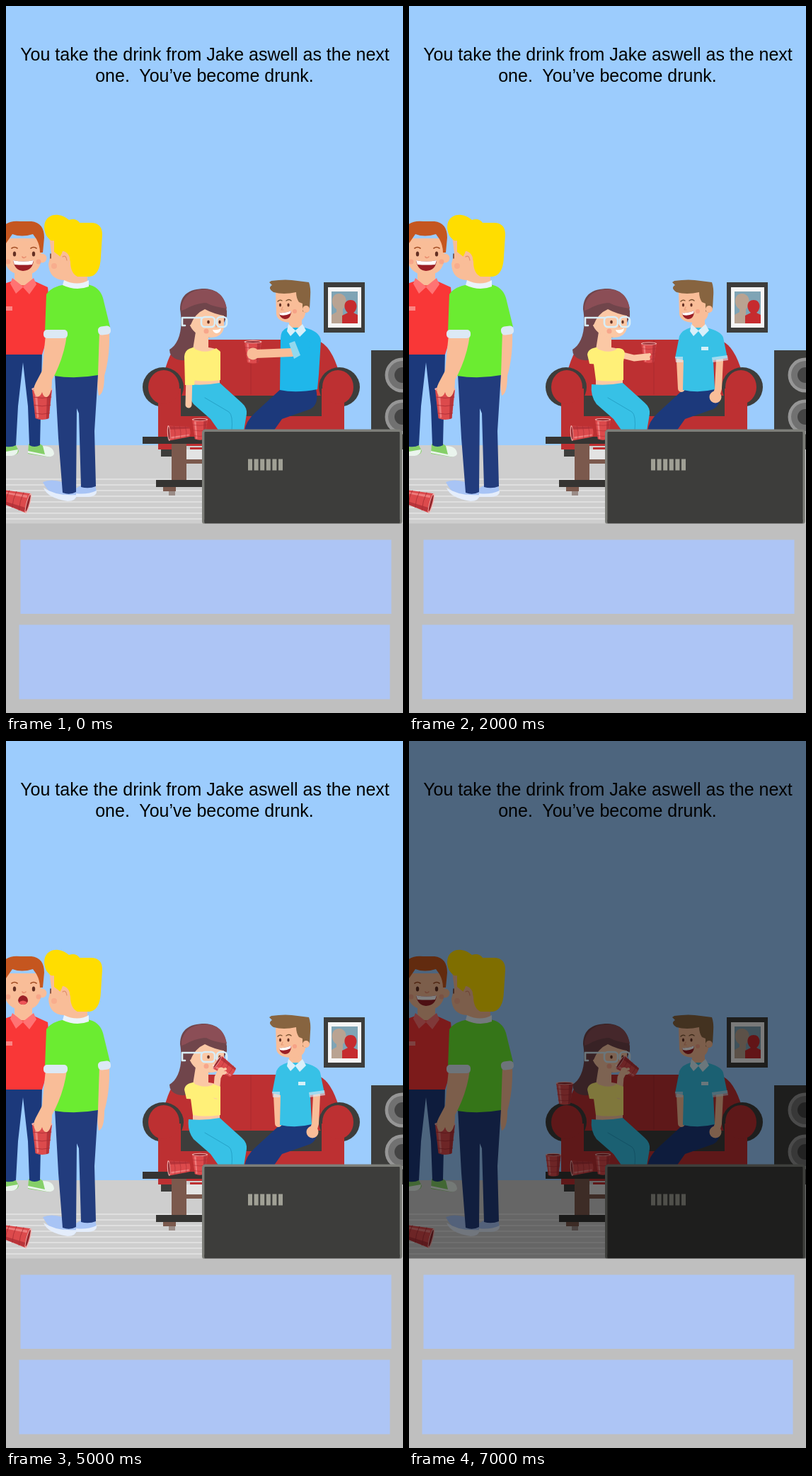
An HTML page for the animation above (8000 ms loop, 561 by 998 pixels).

```html
<!DOCTYPE html>
<html lang="en">
<head>
<meta charset="utf-8">
<title>Party scene</title>
<style>
  html, body { margin: 0; width: 100%; height: 100%; overflow: hidden; }
  svg { display: block; width: 561px; height: 998px; }
  text { font: 25px "Liberation Sans", Arial, sans-serif; text-anchor: middle; }
  .line { fill: none; stroke-linecap: round; stroke-linejoin: round; }
  .skin { fill: #f9bd98; }
  .arm { stroke: #f9bd98; }
  .fair { fill: #fbc8a5; }
  .fairArm { stroke: #fbc8a5; stroke-width: 9; }
  .navy { fill: #1c397b; }
  .cyan { fill: #37c1e6; }
  .dark { fill: #3d3d3b; }
  .red { fill: #bd3032; }
  .yellow { fill: #fff078; }
  .cuff { fill: #dce9f5; }
  .eye { fill: #633023; }
  .mouth { fill: #9b1f26; }
  .blush { fill: #f58f79; }
</style>
</head>
<body>
<svg viewBox="0 0 561 998">
  <defs>
    <g id="cup">
      <path fill="#dc4a4c" d="M-12-15H12L8 14Q0 17-8 14z"/>
      <path fill="#b8343a" d="M6-13H11L8 14 5 15z"/>
      <path fill="#ee7c7c" d="M-9-12H-6L-4 13-6 14z"/>
      <path class="line" stroke="#a82d34" stroke-width=".6" d="M-11-7Q0-5 11-7M-10 1Q0 3 10 1M-9 9Q0 11 9 9"/>
      <ellipse cy="-15" rx="12.5" ry="2.2" fill="#f2b3b0"/>
      <ellipse cy="-14.8" rx="10.5" ry="1.3" fill="#96282e"/>
    </g>
    <g id="woofer">
      <circle r="24.5" fill="#969696"/>
      <circle r="20" fill="#717171"/>
      <circle r="11" fill="#444"/>
    </g>
    <pattern id="rug" width="16" height="16" y="662" patternUnits="userSpaceOnUse">
      <path stroke="#e5e5e5" stroke-width="1.5" d="M0 6H16M0 14H16"/>
    </pattern>
  </defs>

  <!-- room -->
  <rect width="561" height="731" fill="#9cccfd"/>
  <rect y="620" width="561" height="111" fill="#cecece"/>
  <rect y="662" width="290" height="66" fill="url(#rug)"/>
  <rect class="dark" x="449" y="390" width="58" height="71"/>
  <rect x="455" y="397" width="47" height="57" fill="#f5f5f5"/>
  <rect x="460" y="403" width="37" height="45" fill="#7fa4b5"/>
  <path fill="#b9a392" d="M460 448V436L467 432V428C456 420 461 405 471 406C483 407 483 422 476 428V448z"/>
  <path fill="#c62b2e" d="M475 448V437L483 433C476 427 477 415 487 415C497 415 498 428 491 433L497 436V448z"/>
  <rect class="dark" x="516" y="486" width="45" height="140"/>
  <use href="#woofer" x="560" y="521"/>
  <use href="#woofer" x="560" y="580"/>

  <!-- sofa -->
  <path class="red" d="M225 560V512Q237 472 255 471H435Q457 473 470 515V560z"/>
  <path class="dark" d="M245 550H449V582H245zM219 624H236V636H219z"/>
  <rect class="red" x="246" y="579" width="202" height="42"/>
  <path class="line" stroke="#a92b2e" d="M346 548V472"/>
  <ellipse class="dark" cx="222" cy="538" rx="29" ry="28"/>
  <ellipse class="dark" cx="471" cy="538" rx="29" ry="28"/>
  <path class="red" d="M215 540H247V626H215zM446 540H478V626H446z"/>
  <ellipse class="red" cx="223" cy="538" rx="22" ry="24"/>
  <ellipse class="red" cx="469" cy="538" rx="22" ry="24"/>
  <use href="#cup" data-on="7" x="220" y="498"/>

  <!-- man on the sofa -->
  <path class="navy" d="M388 541H438Q443 562 430 569L390 583 378 600H337Q339 586 352 574z"/>
  <path class="skin" d="M400 438H418V456Q408 463 400 456z"/>
  <path class="skin" d="M381 403H423V434Q421 447 404 447Q384 447 382 435z"/>
  <path fill="#876440" d="M375 388Q396 385 412 388L428 390Q431 398 430 410L429 428 424 433 419 431V420L414 418Q410 412 410 404Q392 408 378 404Q369 398 376 394L372 390z"/>
  <circle class="skin" cx="424" cy="428" r="5"/>
  <circle class="blush" cx="408" cy="431" r="3" opacity=".6"/>
  <g class="eye">
    <ellipse cx="387.5" cy="422" rx="1.6" ry="2.5"/><ellipse cx="399" cy="422" rx="1.6" ry="2.5"/>
  </g>
  <path class="line" stroke="#76502f" stroke-width="1.3" d="M384 417Q387 414 390 416M396 416Q400 413 403 416"/>
  <path class="line" stroke="#e79a79" stroke-width="1.2" d="M391 425L389 429H392"/>
  <path class="mouth" d="M386 433Q395 434 403 430Q403 442 394 442Q387 441 386 433z"/>
  <path fill="#fff" d="M386 433Q395 434 403 430L402 434Q394 438 387 436z"/>
  <g data-on="234567">
    <path class="line arm" stroke-width="10" d="M383 500L385 540M439 500L437 540 434 551"/>
    <circle class="skin" cx="433" cy="552" r="8.5"/>
    <path class="cyan" d="M398 454H420Q441 459 444 468L450 497 430 500 432 541Q410 547 387 542L388 500 376 497 382 466Q386 457 398 454z"/>
    <path class="cuff" fill-opacity=".65" d="M376 495H387V503H377zM428 496L450 493 451 500 429 503z"/>
    <rect x="413" y="481" width="10" height="5" fill="#d5f0f8"/>
  </g>
  <g data-on="01">
    <path fill="#1fb7ea" d="M398 454H422Q443 459 445 472L442 520 440 541Q410 547 387 542L388 470Q388 457 398 454z"/>
    <use href="#cup" x="349" y="489"/>
    <path class="line arm" stroke-width="12" d="M404 489L353 491"/>
    <circle class="skin" cx="349" cy="491" r="8.5"/>
    <path fill="#1fb7ea" d="M420 468L436 477 409 497 402 476z"/>
    <path fill="#91d8ee" d="M400 476L408 473 416 493 407 498z"/>
  </g>
  <path fill="#d8effa" d="M399 449L409 458 419 449 424 458 415 467 409 459 402 466 397 459z"/>

  <!-- woman on the sofa -->
  <path fill="#70454b" d="M246 428C246 406 261 399 281 399C302 400 313 414 312 438L300 465 278 470Q281 492 262 497Q252 502 242 499Q231 495 231 485C243 478 251 459 246 428z"/>
  <path class="fair" d="M268 460H286V482Q296 483 302 487V536H264V485z"/>
  <path class="fair" d="M260 432Q280 420 308 432V452Q307 467 290 468Q268 468 260 451z"/>
  <path fill="#8b4e56" d="M248 424C252 406 266 400 281 400C298 400 309 409 312 427Q296 425 280 419Q262 421 248 432z"/>
  <path fill="#70454b" d="M248 430Q266 423 283 419Q300 428 312 430V438Q294 435 281 428Q267 434 261 450L250 452z"/>
  <circle class="blush" cx="283" cy="459" r="3.5" opacity=".6"/>
  <g class="eye">
    <ellipse cx="286" cy="446" rx="1.8" ry="2.6"/><ellipse cx="302" cy="446" rx="1.6" ry="2.6"/>
  </g>
  <g class="line" stroke="#d8eef8" stroke-width="2.6">
    <path d="M249 440H277M249 440V451H253"/>
    <rect x="276" y="439" width="19" height="14" rx="5"/><rect x="298" y="439" width="14" height="14" rx="5"/>
  </g>
  <path class="line" stroke="#e79a79" d="M296 450L298 453H296"/>
  <path fill="#fff" d="M292 457Q299 458 304 455Q303 462 297 462Q293 461 292 457z"/>
  <path class="cyan" d="M258 534Q281 536 302 532L333 560Q341 567 340 576L336 600H301L289 583 265 562Q256 550 258 534z"/>
  <path class="line" stroke="#25a2c8" d="M281 553L315 573Q321 577 319 600"/>
  <path class="yellow" d="M263 482Q281 493 297 483L303 488V528Q281 531 264 528L261 505z"/>
  <g data-on="0">
    <path class="line fairArm" d="M259 520L258 563"/>
    <path class="yellow" d="M266 482Q253 483 252 495L253 535H266L270 500z"/>
  </g>
  <path class="yellow" data-on="123567" d="M266 482Q253 483 252 492L255 505 270 506z"/>
  <g data-on="12">
    <use href="#cup" data-on="2" transform="translate(339 490) scale(.9)"/>
    <path class="line fairArm" d="M298 492L318 497 336 495"/>
    <path class="line fairArm" style="stroke-width:4" d="M332 494L340 492M332 498H339"/>
    <path class="yellow" d="M293 483Q304 482 305 490L303 502 291 504z"/>
  </g>
  <g data-on="46">
    <use href="#cup" transform="translate(312 496) rotate(4) scale(.9 1)"/>
    <path class="line fairArm" d="M268 527L298 511 307 503"/>
    <path class="line fairArm" style="stroke-width:4" d="M307 500L314 499M308 505L314 504"/>
    <path class="yellow" d="M266 482Q252 483 252 493L255 530Q258 537 270 531L276 522 270 500z"/>
  </g>
  <g data-on="357">
    <use href="#cup" transform="translate(310 461) rotate(-56) scale(.92)"/>
    <path class="line fairArm" d="M297 501L299 475 304 465"/>
    <path class="line fairArm" style="stroke-width:4" d="M302 466L310 463M303 470L310 468"/>
    <path class="yellow" d="M292 484L303 488V506L291 503z"/>
  </g>

  <!-- table and television -->
  <path fill="#e3e3e3" d="M255 626H278V640H255z"/>
  <path class="red" d="M260 623H278V626H260z"/>
  <path fill="#7b594d" d="M234 617H255V672H234zM255 640H278V646H255zM222 678H240V685H222z"/>
  <path fill="#9a8c87" d="M230 685H239V691H230z"/>
  <path fill="#353432" d="M193 608H284V618H193zM212 669H284V679H212z"/>
  <use href="#cup" data-on="67" transform="translate(204 599) scale(.9 1)"/>
  <use href="#cup" transform="translate(245 602) rotate(-94) scale(.88 1)"/>
  <use href="#cup" transform="translate(274 598) scale(.9 .95)"/>
  <rect class="dark" x="278.7" y="599.2" width="279.5" height="131.5" rx="3" stroke="#7d7e79" stroke-width="3.4"/>
  <rect class="dark" x="280.5" y="725" width="276" height="6"/>
  <path stroke="#a0a095" stroke-width="16" stroke-dasharray="6 2.6" d="M342 647.5H391"/>

  <!-- red-haired man -->
  <path fill="#85cf68" d="M-5 620H14L18 628Q17 634 8 634H-5zM32 618H48L67 632Q66 637 57 636L31 632z"/>
  <path fill="#eaf4ed" d="M52 621Q67 621 68 632Q67 637 58 636L31 631V628L55 633zM-5 630L17 626Q17 634 8 635H-5z"/>
  <path class="navy" d="M-5 488H51L48 620Q40 624 33 620L31 565 24 503 17 565 14 620Q7 624-5 621z"/>
  <path fill="#f93737" d="M-5 393L12 387H37L59 397 64 450 51 492H-5z"/>
  <path class="skin" d="M12 370H37V388Q24 401 12 388z"/>
  <path fill="#ff7373" d="M9 384L24 396 39 384 43 393 33 407 24 397 14 406 6 392z"/>
  <path fill="#fb8583" d="M0 424H9V430H0z"/>
  <path class="skin" d="M-3 328H50V355Q49 379 25 380Q0 379-3 355z"/>
  <path fill="#c5561f" d="M-5 312Q4 302 20 304H36Q54 306 54 327L52 348H48Q48 338 43 329L38 322Q22 327 9 322L0 335-5 340z"/>
  <circle class="skin" cx="51" cy="356" r="6.5"/>
  <g class="blush" opacity=".5"><circle cx="3" cy="361" r="3.5"/><circle cx="46" cy="361" r="3.5"/></g>
  <g class="eye"><ellipse cx="12" cy="350" rx="2.2" ry="3.6"/><ellipse cx="39" cy="350" rx="2.2" ry="3.6"/></g>
  <path class="line" stroke="#a04a20" stroke-width="1.6" d="M8 342Q12 339 16 342M35 342Q39 339 43 342"/>
  <path class="line" stroke="#e88d6e" stroke-width="1.6" d="M23 354Q25 357 28 354"/>
  <g data-on="02467">
    <path class="mouth" d="M10 359Q25 362 39 359Q38 373 24 374Q12 373 10 359z"/>
    <path fill="#fff" d="M10 359Q25 362 39 359L37 365Q25 366 12 365z"/>
  </g>
  <g data-on="135">
    <path class="mouth" d="M17 366Q18 360 24 359Q31 360 31 367Q30 372 24 372Q18 372 17 366z"/>
    <path fill="#ed5558" d="M18 369Q24 364 30 369Q27 373 24 372Q20 372 18 369z"/>
  </g>

  <!-- blond man, from behind -->
  <path class="skin" d="M129 460H146Q147 495 139 522Q139 547 131 550Q128 535 130 520z"/>
  <path fill="#a8c4f5" d="M52 672Q63 667 80 672L99 684V692Q98 699 86 698Q63 694 52 672zM97 682L107 676H126L128 686Q126 692 112 692H98z"/>
  <path fill="#e4edfb" d="M53 680Q70 692 100 690Q99 699 87 699Q59 695 53 680zM99 688Q115 690 128 684Q129 692 116 693H99z"/>
  <path fill="#223c7d" d="M69 520H130L125 600 127 678Q117 682 106 679L103 575 100 568 99 686Q90 691 80 687L74 610z"/>
  <path class="skin" d="M61 325L64 349 60 364Q61 386 82 387V394H115V330z"/>
  <path class="line" stroke="#6d392b" stroke-width="1.5" d="M63 350V356"/>
  <circle class="blush" cx="68" cy="367" r="4" opacity=".35"/>
  <path fill="#ffdd00" d="M57 324C49 306 59 293 74 295Q82 296 89 302Q99 299 104 306H120Q136 306 136 323L134 354Q133 380 118 382H101Q91 377 91 361Q88 346 80 346L77 354 68 347V331Q63 333 57 324z"/>
  <ellipse class="skin" cx="83" cy="357" rx="7" ry="9"/>
  <path class="line" stroke="#df8f6f" stroke-width="1.2" d="M80 354Q85 351 86 359"/>
  <path fill="#6bec31" d="M57 407Q64 396 84 393H115Q132 396 137 412L147 453 132 459 130 521Q98 527 68 522L69 463 55 460z"/>
  <path fill="#eaf3fa" d="M82 387Q101 396 117 387V396Q99 403 80 394z"/>
  <use href="#cup" transform="translate(51 562) scale(1.18 1.42)"/>
  <path class="skin" d="M56 464H86Q82 497 65 528Q65 548 58 552Q53 553 51 545Q48 553 43 551Q36 543 42 532L51 515z"/>
  <rect class="cuff" x="53" y="457" width="34" height="12" rx="5"/>
  <rect class="cuff" x="130" y="452" width="18" height="12" rx="5" transform="rotate(-8 139 458)"/>
  <use href="#cup" transform="translate(13 697) rotate(105) scale(1.17 1.27)"/>

  <text x="281" y="77">You take the drink from Jake aswell as the next</text>
  <text x="280.5" y="107">one.&nbsp; You’ve become drunk.</text>
  <rect id="dim" width="561" height="732"/>

  <!-- answer panel -->
  <rect y="730.5" width="561" height="268" fill="#bfbfbf"/>
  <g fill="#adc5f5">
    <rect x="20.5" y="753.5" width="524" height="104.5"/>
    <rect x="18.5" y="873.5" width="524" height="105"/>
  </g>
</svg>
<script>
  const parts = document.querySelectorAll('[data-on]');
  const dim = document.getElementById('dim');
  const dimming = { 6: 0.3, 7: 0.5 };

  function draw(now) {
    const beat = Math.floor(now / 1000) % 8;
    for (const part of parts) {
      part.style.display = part.dataset.on.includes(beat) ? '' : 'none';
    }
    dim.style.opacity = dimming[beat] || 0;
    requestAnimationFrame(draw);
  }
  draw(0);
</script>
</body>
</html>
```
